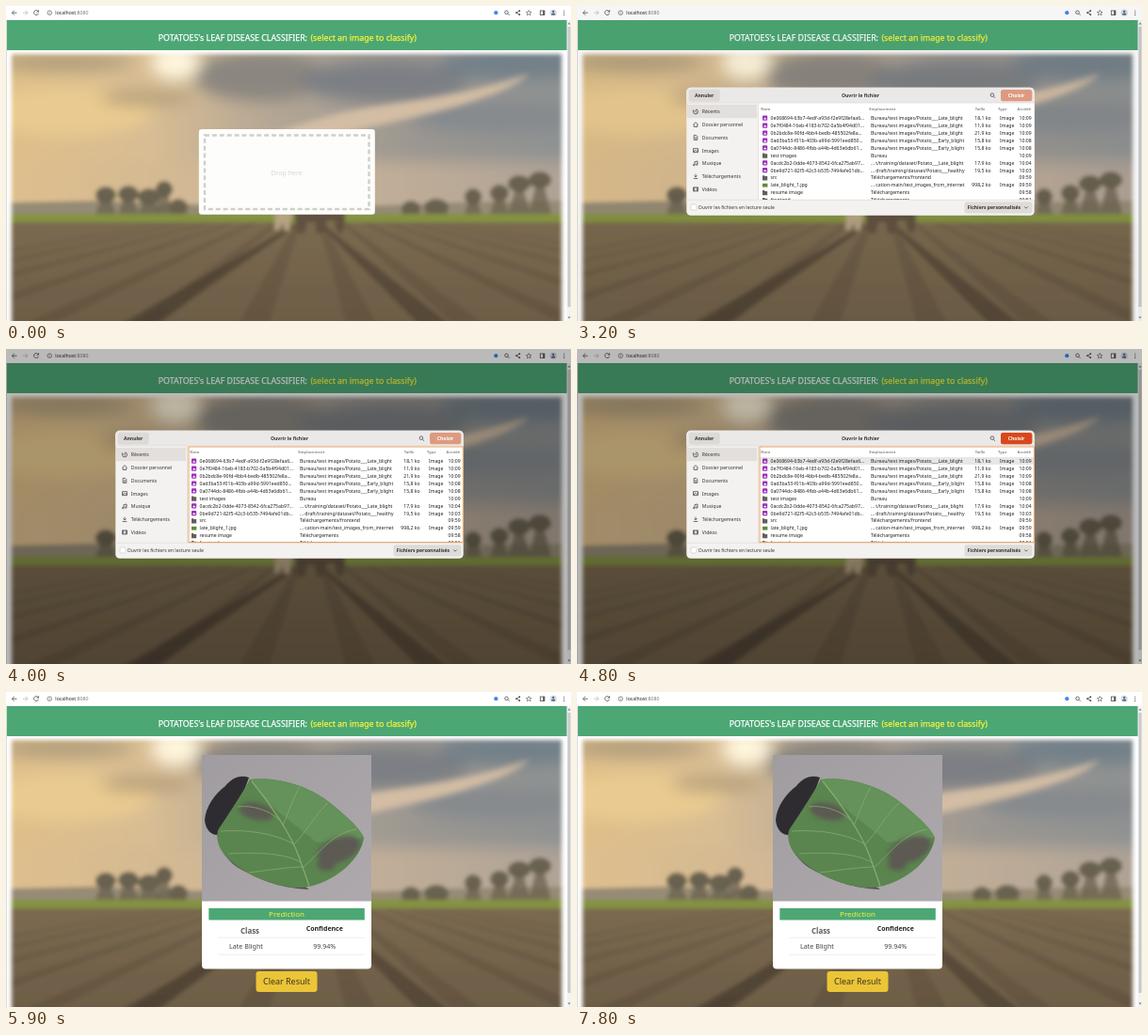
Animation, 600 px wide and 335 px high, one loop 8 s. Source, as an HTML page:

```html
<!DOCTYPE html>
<html lang="en">
<head>
<meta charset="utf-8">
<title>Leaf disease classifier</title>
<style>
html, body { margin: 0; width: 100%; height: 100%; overflow: hidden; background: #fff; }
svg { display: block; width: 100vw; height: 100vh; }
text { font-family: "Noto Sans", "Open Sans", sans-serif; white-space: pre; }
.b { font-weight: 700; }
.title { font-size: 8.8px; stroke-width: .25; }
.mid { text-anchor: middle; }
.end { text-anchor: end; }
.line { fill: none; stroke: #4a4a4a; stroke-width: .8; }
#drop, #card, #busy, #result, #dialog, #focus, #picked, #dim { animation: 8s step-end infinite; }
#drop { animation-name: drop; }
#card { animation-name: card; }
#busy { animation-name: busy; }
#result { animation-name: result; }
#focus { animation-name: focus; }
#picked { animation-name: picked; }
#dialog { animation-name: dialog; transform-origin: 0 155.5px; }
#dim { animation-name: dim; }
@keyframes drop { 0% { opacity: 1 } 68.75%, 100% { opacity: 0 } }
@keyframes card { 0% { opacity: 0 } 68.75%, 100% { opacity: 1 } }
@keyframes busy { 0% { opacity: 1 } 73.75%, 100% { opacity: 0 } }
@keyframes result { 0% { opacity: 0 } 73.75%, 100% { opacity: 1 } }
@keyframes focus { 0% { opacity: 0 } 42.5%, 100% { opacity: 1 } }
@keyframes picked { 0% { opacity: 0 } 56.25%, 100% { opacity: 1 } }
@keyframes dialog {
  0% { transform: scaleY(0) }
  38.75% { transform: scaleY(.55) }
  40% { transform: none }
  68.75% { transform: scaleY(.65) }
  70% { transform: scaleY(.25) }
  71.25%, 100% { transform: scaleY(0) }
}
@keyframes dim {
  0% { opacity: 0 }
  38.75% { opacity: 0; animation-timing-function: steps(8) }
  48.75% { opacity: 1 }
  68.75% { opacity: 1; animation-timing-function: steps(4) }
  73.75%, 100% { opacity: 0 }
}
</style>
</head>
<body>
<svg viewBox="0 0 600 335" preserveAspectRatio="none">
  <defs>
    <linearGradient id="sky">
      <stop offset="0" stop-color="#dfbf88"/>
      <stop offset=".25" stop-color="#d8bd94"/>
      <stop offset=".48" stop-color="#b3a695"/>
      <stop offset=".75" stop-color="#9a9691"/>
      <stop offset="1" stop-color="#8f9292"/>
    </linearGradient>
    <linearGradient id="haze">
      <stop offset="0" stop-color="#e0c08c"/>
      <stop offset=".45" stop-color="#cdb597"/>
      <stop offset="1" stop-color="#aca196"/>
    </linearGradient>
    <linearGradient id="soil" x2="0" y2="1">
      <stop offset="0" stop-color="#7b6a50"/>
      <stop offset="1" stop-color="#6a5a44"/>
    </linearGradient>
    <linearGradient id="stone" x2="1" y2="1">
      <stop offset="0" stop-color="#a09c9f"/>
      <stop offset="1" stop-color="#aea9ac"/>
    </linearGradient>
    <filter id="soft" x="-20%" y="-50%" width="140%" height="200%"><feGaussianBlur stdDeviation="8"/></filter>
    <filter id="blur" x="-5%" y="-5%" width="110%" height="110%"><feGaussianBlur stdDeviation="2"/></filter>
    <filter id="spot" x="-30%" y="-30%" width="160%" height="160%"><feGaussianBlur stdDeviation="2.5"/></filter>
    <clipPath id="skyBox"><rect x="6" y="51" width="584" height="180"/></clipPath>
    <clipPath id="soilBox"><rect x="6" y="230" width="584" height="130"/></clipPath>
    <clipPath id="listBox"><rect x="193" y="103" width="293" height="103"/></clipPath>
    <path id="leaf" d="M259 93C282 90 318 97 343 117C362 132 377 146 380 155C377 177 352 200 322 207C298 212 262 198 244 184C229 173 222 161 225 147C232 136 246 116 259 93Z"/>
    <clipPath id="leafBox"><use href="#leaf"/></clipPath>
  </defs>

  <rect width="600" height="335" fill="#fff"/>

  <g filter="url(#blur)">
    <g clip-path="url(#skyBox)">
      <rect x="6" y="51" width="584" height="180" fill="url(#sky)"/>
      <g filter="url(#soft)">
        <rect x="-20" y="165" width="640" height="70" fill="url(#haze)"/>
        <ellipse cx="60" cy="60" rx="75" ry="9" fill="#ad9b7c"/>
        <ellipse cx="65" cy="112" rx="90" ry="26" fill="#e9ca90"/>
        <ellipse cx="150" cy="98" rx="50" ry="8" fill="#b7a07c"/>
        <ellipse cx="270" cy="75" rx="70" ry="26" fill="#8b867f"/>
        <ellipse cx="400" cy="80" rx="90" ry="22" fill="#7c7f83"/>
        <ellipse cx="540" cy="62" rx="80" ry="16" fill="#728088"/>
        <ellipse cx="520" cy="118" rx="90" ry="17" fill="#868a8e"/>
        <ellipse cx="180" cy="60" rx="26" ry="18" fill="#fff6dd"/>
      </g>
      <path d="M250 152Q320 116 410 104T556 72Q530 96 430 119T300 146Z" fill="#d3bda4" filter="url(#spot)"/>
    </g>
    <path d="M6 209L95 207 200 211 400 212 480 209 590 207V224H6z" fill="#968b74"/>
    <g id="trees" fill="#69624f"></g>
    <rect x="6" y="221" width="584" height="10" fill="#84933f"/>
    <g clip-path="url(#soilBox)">
      <rect x="6" y="230" width="584" height="130" fill="url(#soil)"/>
      <g id="furrows" fill="#41352a"></g>
    </g>
    <path d="M306 218h54v10l-2 13h-6l-3-12h-8l-4 13h-7l-2-12h-8l-3 12h-8z" fill="#61513f"/>
    <path d="M286 219h18l-3 20h-5l-2-9-4 8h-5z" fill="#b5a382"/>
  </g>

  <rect width="600" height="15" fill="#fff"/>
  <rect x="1" y="15" width="595" height="32" fill="#4ca774"/>
  <rect y="15" width="1" height="320" fill="#dcdcdc"/>
  <rect x="595.5" y="15" width="4.5" height="320" fill="#f3f3f3"/>
  <rect x="596.5" y="22" width="3" height="298" fill="#c9c9c9"/>
  <path d="M596.5 19.5h3l-1.5-2zM596.5 330.5h3l-1.5 2z" fill="#777"/>

  <g class="line">
    <path d="M11.5 7.2H6.5M8.8 4.8L6.4 7.2l2.4 2.4"/>
    <path d="M18 7.2h5M20.7 4.8l2.4 2.4-2.4 2.4" stroke="#bbb"/>
    <path d="M34.3 5.8a2.5 2.5 0 1 0 .2 2M34.6 4.3v1.9h-2"/>
    <circle cx="46.3" cy="7.2" r="2.3" stroke-width=".6"/>
    <path d="M46.3 6.8v1.6M46.3 5.6v.5" stroke-width=".6"/>
    <circle cx="531.5" cy="6.8" r="1.8"/><path d="M533 8.3l1.6 1.6"/>
    <path d="M545.3 5.2l-3.2 2 3.2 2"/>
    <path d="M555.2 4.5l.8 1.8 2 .2-1.5 1.3.5 2-1.8-1.1-1.8 1.1.5-2-1.5-1.3 2-.2z" stroke-width=".6"/>
    <rect x="567.3" y="5" width="4.6" height="4.4"/><path d="M571 5v4.4" stroke-width="1.6"/>
  </g>
  <g fill="#4a4a4a">
    <circle cx="545.3" cy="5.2" r=".9"/><circle cx="542" cy="7.2" r=".9"/><circle cx="545.3" cy="9.2" r=".9"/>
    <circle cx="592.7" cy="5" r=".6"/><circle cx="592.7" cy="7.2" r=".6"/><circle cx="592.7" cy="9.4" r=".6"/>
  </g>
  <circle cx="520.3" cy="7.2" r="2.1" fill="#4285f4"/>
  <circle cx="581.2" cy="7.2" r="3.6" fill="#d5dbe6"/>
  <path d="M579 9.5a2.2 2 0 0 1 4.4 0z" fill="#4a5a78"/><circle cx="581.2" cy="5.9" r="1.1" fill="#4a5a78"/>
  <text x="52.3" y="9.2" font-size="5.2" fill="#222">localhost<tspan fill="#777">:8080</tspan></text>

  <text class="title" x="161.8" y="37" fill="#fff" stroke="#fff">POTATOES's LEAF DISEASE CLASSIFIER:</text>
  <text class="title" x="323.4" y="37" fill="#f8f33c" stroke="#f8f33c">(select an image to classify)</text>

  <g id="drop">
    <rect x="204.8" y="131" width="187" height="90.8" rx="3" fill="#fdfdfc"/>
    <rect x="211" y="137.5" width="174.5" height="78.5" fill="none" stroke="#cfcfcb" stroke-width="2.4" stroke-dasharray="5 2.9"/>
    <text class="mid" x="298" y="180" font-size="7.1" fill="#d6d6d6">Drop here</text>
  </g>

  <g id="card">
    <g id="busy">
      <text x="208.5" y="242" font-size="7.1" fill="#4b4640">Processing</text>
    </g>
    <rect x="208" y="67" width="180" height="156" fill="url(#stone)"/>
    <path d="M258 91C248 87 238 93 233 100C222 108 212 122 211 136C212 148 219 152 224 152L248 118Z" fill="#2f2c31"/>
    <path d="M224 150C226 168 236 182 252 190S285 208 322 210L300 196 236 160Z" fill="#545053"/>
    <use href="#leaf" fill="#5a854e"/>
    <g clip-path="url(#leafBox)">
      <path d="M259 93C282 90 318 97 343 117C362 132 377 146 380 155L330 160 280 120Z" fill="#65915a"/>
      <g filter="url(#spot)" fill="#5c5a52">
        <ellipse cx="266" cy="127" rx="19" ry="9" transform="rotate(12 266 127)"/>
        <ellipse cx="353" cy="168" rx="24" ry="13" transform="rotate(-22 353 168)"/>
        <ellipse cx="340" cy="184" rx="10" ry="6"/>
      </g>
      <g fill="none" stroke="#86ab70" stroke-width=".8">
        <path d="M261 95C280 118 302 150 311 175S320 200 322 207" stroke-width="1.3"/>
        <path d="M314 182C300 172 270 170 236 172M306 162C285 150 255 146 228 148M316 186C300 186 275 190 258 192M290 136C280 126 262 120 246 122"/>
        <path d="M316 186C330 175 345 150 372 146M306 162C318 150 330 128 342 118M294 142C300 128 306 110 312 101"/>
      </g>
    </g>
    <g id="result">
      <path d="M208 222.5h180v68a4 4 0 0 1-4 4H212a4 4 0 0 1-4-4z" fill="#fff"/>
      <rect x="215.3" y="230" width="165.5" height="12.5" fill="#4ca774"/>
      <text class="mid" x="298" y="239.2" font-size="7.95" fill="#f8f33c">Prediction</text>
      <text class="b mid" x="259" y="257" font-size="7.9" fill="#5c5c5c">Class</text>
      <text class="b mid" x="338.3" y="254.2" font-size="7" fill="#222">Confidence</text>
      <path d="M225 261.3h156M225 279.3h156" stroke="#e8e8e8" stroke-width=".7"/>
      <text class="mid" x="255" y="272.6" font-size="7.15" fill="#444">Late Blight</text>
      <text class="mid" x="338.2" y="272.6" font-size="7.1" fill="#444">99.94%</text>
      <rect x="265.5" y="297" width="65" height="22" rx="3.2" fill="#ebc537"/>
      <text class="mid" x="298" y="311.2" font-size="8.95" fill="#3a3420">Clear Result</text>
    </g>
  </g>

  <rect id="dim" width="600" height="335" fill="#000" fill-opacity=".27"/>

  <g id="dialog" font-size="5.1" fill="#333">
    <rect x="116.3" y="86.8" width="369.4" height="136" rx="4.5" fill="#f4f2f0"/>
    <path d="M116.3 103V91.3a4.5 4.5 0 0 1 4.5-4.5h360.4a4.5 4.5 0 0 1 4.5 4.5V103z" fill="#ebe9e7"/>
    <rect x="118.8" y="88.7" width="33" height="12.8" rx="2.5" fill="#dcd9d6"/>
    <text class="b mid" x="135.2" y="97">Annuler</text>
    <text class="b mid" x="301" y="97">Ouvrir le fichier</text>
    <g class="line"><circle cx="440.9" cy="94.6" r="1.8"/><path d="M442.3 96l1.7 1.7"/></g>
    <rect x="450" y="88.9" width="33.3" height="12.4" rx="2.5" fill="#dd9a80"/>

    <rect x="117" y="104.8" width="74" height="14.4" fill="#e2dfdd"/>
    <g id="places"></g>
    <rect x="193" y="103" width="292.7" height="103" fill="#fff"/>
    <path d="M116.3 103h369.4M192.5 103v103M116.3 206.2h369.4" stroke="#d8d5d2" stroke-width=".6"/>

    <g id="picked">
      <rect x="194" y="115" width="291" height="8" fill="#e9e7e5"/>
      <rect x="450" y="88.9" width="33.3" height="12.4" rx="2.5" fill="#d9481c"/>
    </g>
    <text class="b mid" x="466.6" y="97" fill="#fff">Choisir</text>
    <g class="b" font-size="4.1" fill="#8a8a8a">
      <text x="195.3" y="110.6">Nom</text>
      <text x="310.3" y="110.6">Emplacement</text>
      <text class="end" x="433.5" y="110.6">Taille</text>
      <text x="447" y="110.6">Type</text>
      <text x="467.6" y="110.6">Accédé</text>
    </g>
    <g id="files" clip-path="url(#listBox)" fill="#222"></g>
    <rect id="focus" x="194" y="104" width="291.3" height="101.6" fill="none" stroke="#e9a060" stroke-width="1"/>

    <rect x="121" y="211" width="6" height="6" rx="1.2" fill="#fff" stroke="#c9c5c1" stroke-width=".6"/>
    <text x="128.8" y="215.9">Ouvrir les fichiers en lecture seule</text>
    <rect x="411.5" y="208.2" width="72" height="12.2" rx="2.5" fill="#dedbd8"/>
    <text class="b" x="414.8" y="216.1">Fichiers personnalisés</text>
    <path class="line" d="M475.3 213.5l1.7 1.7 1.7-1.7"/>
  </g>
</svg>
<script>
const fill = (id, parts) => { document.getElementById(id).innerHTML = parts.join(""); };
const text = (x, y, s, cls = "") => `<text x="${x}" y="${y}" class="${cls}">${s}</text>`;
const range = n => [...Array(n).keys()];

// Tree clumps along the horizon: x, crown top, half width.
const trees = [[106, 192, 11], [130, 191, 11], [152, 194, 12], [168, 186, 9], [183, 205, 10],
  [430, 207, 10], [457, 205, 13], [496, 194, 9], [524, 190, 10], [545, 180, 12], [567, 176, 12]];
fill("trees", trees.map(([x, y, r]) => `<ellipse cx="${x}" cy="${y + 9}" rx="${r}" ry="9"/>
  <path d="M${x - 3} ${y + 9}h6L${x + r} 221H${x - r}z" opacity=".75"/>`));

// Faint furrows fan out from the vanishing point, crossed by two deep wheel tracks.
const furrow = (x1, y1, x2, w, o) => `<path opacity="${o}" d="M${x1 - 2} ${y1}h5L${x2 + w} 345H${x2 - w}z"/>`;
fill("furrows", [
  ...range(14).map(i => furrow(322 + (i - 6.5) * 24, 231, 320 + (i - 6.5) * 120, 17, .2)),
  furrow(305, 234, 130, 20, .55),
  furrow(336, 234, 462, 17, .5)
]);

const glyphs = [
  "M-2.5 0a2.5 2.5 0 1 0 2.5-2.5M0-1.5V0l1.2 1M-2.6-2v1.5h1.5",
  "M-2.6 0L0-2.5 2.6 0M-1.8-.3v2.6h3.6v-2.6",
  "M-1.8-2.5h2.4l1.2 1.2v3.8h-3.6zM-.8 0h1.6M-.8 1.2h1.6",
  "M-2.5-2h5v4h-5zM-2 1.5l1.5-2 1.2 1.2.8-.7 1 1.2",
  "M-1 1.7v-3.5l3-.6v3.5M-1 1.7a.8.8 0 1 1-.1-.4M2 1.1a.8.8 0 1 1-.1-.4",
  "M0-2.5v3.2M-1.5-.7L0 .8 1.5-.7M-2.3 2.3h4.6",
  "M-2.5-2h5v4h-5zM-1.3-2v4M1.3-2v4"
];
const places = ["Récents", "Dossier personnel", "Documents", "Images", "Musique", "Téléchargements", "Vidéos"];
fill("places", places.map((name, i) => {
  const y = 112.4 + 13.75 * i;
  return `<path class="line" stroke-width=".6" transform="translate(126 ${y})" d="${glyphs[i]}"/>` + text(132.8, y + 1.9, name);
}));

const late = "Potato___Late_blight", early = "Potato___Early_blight", desk = "Bureau/test images/";
const files = [
  ["0e068694-63b7-4edf-a93d-f2e9f28efaa6…", desk + late, "18,1 ko", "10:09"],
  ["0e7f0484-16eb-4183-b702-0a5b4f94d01…", desk + late, "11,9 ko", "10:09"],
  ["0b2bdc8e-90fd-4bb4-bedb-485502fe8a…", desk + late, "21,9 ko", "10:09"],
  ["0ad3ba53-f01b-403b-a99d-5991eed850…", desk + early, "15,8 ko", "10:08"],
  ["0a0744dc-8486-4fbb-a44b-4d63e6db61…", desk + early, "15,8 ko", "10:08"],
  ["test images", "Bureau", "", "10:09"],
  ["0acdc2b2-0dde-4073-8542-6fca275ab97…", "… t/training/dataset/" + late, "17,9 ko", "10:04"],
  ["0be9d721-82f5-42c3-b535-7494afe01db…", "… draft/training/dataset/Potato___healthy", "19,5 ko", "10:03"],
  ["src", "Téléchargements/frontend", "", "09:59"],
  ["late_blight_1.jpg", "… cation-main/test_images_from_internet", "998,2 ko", "09:59"],
  ["resume image", "Téléchargements", "", "09:58"],
  ["frontend", "Téléchargements", "", "09:51"]
];
const icon = (y, size, name) => {
  if (!size) return `<path d="M197 ${y - 4.2}h2l.6.8h2.6v4.4h-5.2z" fill="#62605c"/>`;
  if (name.endsWith("jpg")) return `<rect x="197" y="${y - 3.6}" width="5.4" height="3.8" fill="#5e8a3a"/>`;
  return `<rect x="197" y="${y - 4.4}" width="5.2" height="5.2" rx=".8" fill="#9a2fb8"/>
    <path d="M198 ${y - .4}l1.4-2 1 1.2.5-.5.6 1.3z" fill="#fff"/>`;
};
fill("files", files.map(([name, place, size, time], i) => {
  const y = +(121 + 7.93 * i).toFixed(2);
  return icon(y, size, name) + text(205.6, y, name) + text(312, y, place) +
    (size ? text(439.5, y, size, "end") + text(449, y, "Image") : "") + text(482.6, y, time, "end");
}));
</script>
</body>
</html>
```
